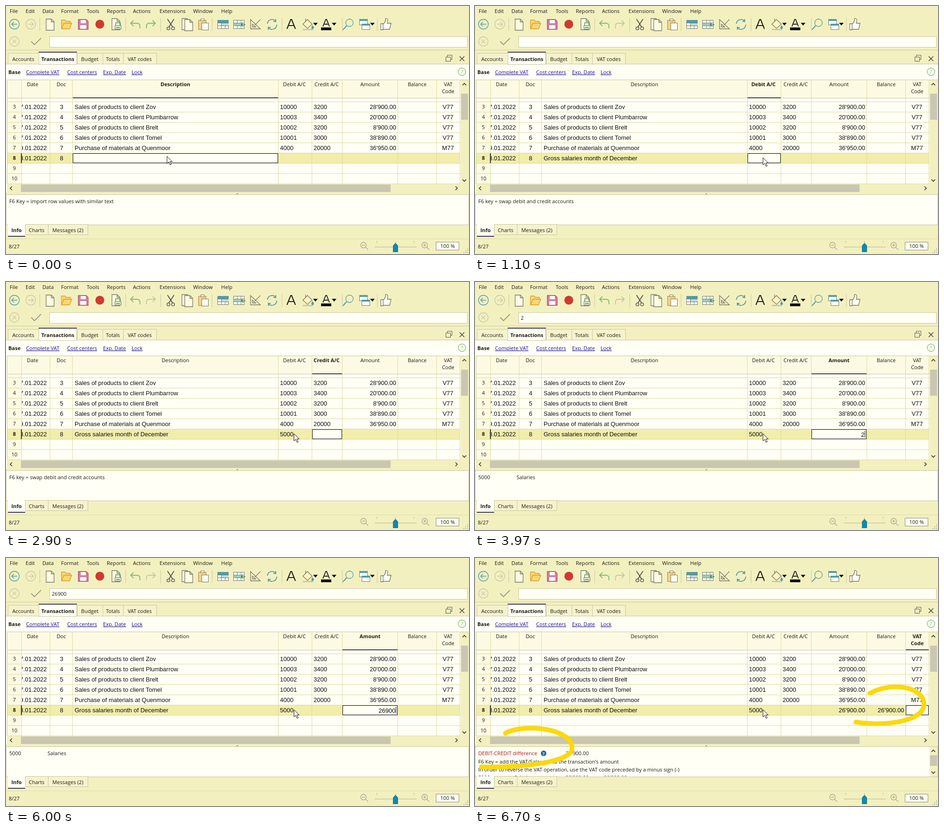
An HTML page for the animation above (6730 ms loop, 992 by 532 pixels).

```html
<!DOCTYPE html>
<html lang="en">
<head>
<meta charset="utf-8">
<title>Entering a transaction</title>
<style>
html, body { margin: 0; width: 100%; height: 100%; overflow: hidden; }
svg { display: block; width: 992px; height: 532px; background: #f3f0c0; }
text { font: 11.1px "Open Sans", sans-serif; white-space: pre; fill: #1c1c14; }
text.cell { font: 13px "Liberation Sans", Arial, sans-serif; fill: #111; }
text.bold { font-weight: 700; }
text.link { fill: #21108f; text-decoration: underline; }
rect { shape-rendering: crispEdges; }
</style>
</head>
<body>
<svg viewBox="0 0 992 532">
  <defs>
    <clipPath id="dateClip"><rect x="34" y="198" width="61" height="184"/></clipPath>
    <clipPath id="infoClip"><rect x="2" y="405" width="972" height="63"/></clipPath>
    <clipPath id="listClip"><rect x="585" y="337" width="389" height="138"/></clipPath>
  </defs>
  <g id="frame"></g>
  <g id="scene"></g>
</svg>
<script>
const LOOP = 6730;
const FACE = '#f3f0c0', PAPER = '#fffff6', LINE = '#c9c6a0', GRID = '#dedaa0', THUMB = '#c9c7b2';
const TEAL = '#4f9da6', GRAY = '#77776a', GREEN = '#7cbf6a', PALE = '#c9c8a8', INK = '#222';

const text = (x, y, s, cls = '', anchor = 'start', extra = '') =>
  `<text x="${x}" y="${y}" class="${cls}" text-anchor="${anchor}" ${extra}>${s}</text>`;
const rect = (x, y, w, h, fill, stroke) => stroke
  ? `<rect x="${x + .5}" y="${y + .5}" width="${w - 1}" height="${h - 1}" fill="${fill}" stroke="${stroke}"/>`
  : `<rect x="${x}" y="${y}" width="${w}" height="${h}" fill="${fill}"/>`;
const path = (d, stroke, fill = 'none', width = 1.3, extra = '') =>
  `<path d="${d}" stroke="${stroke}" fill="${fill}" stroke-width="${width}" ${extra}/>`;
const ring = (x, y, r, stroke, fill = 'none') =>
  `<circle cx="${x}" cy="${y}" r="${r}" stroke="${stroke}" fill="${fill}" stroke-width="1.3"/>`;
const group = (x, y, body) => `<g transform="translate(${x} ${y})">${body}</g>`;
const clip = (id, body) => `<g clip-path="url(#${id})">${body}</g>`;
const chevron = (x, y, dx, dy) => path(dx
  ? `M${x - 2 * dx} ${y - 4}l${4 * dx} 4l${-4 * dx} 4`
  : `M${x - 4} ${y - 2 * dy}l4 ${4 * dy}l4 ${-4 * dy}`, '#333', 'none', 1.6);
const drop = x => path(`M${x - 5} 36h10l-5 6z`, 'none', '#111');
const page = (x, y) => path(`M${x} ${y}h11l6 6v18h-17zM${x + 11} ${y}v6h6`, GRAY, '#fffbe0');
const lens = (x, y, sign, color) => ring(x, y, 6, color) + path(`M${x + 4} ${y + 4}l6 6M${x - 3} ${y}h6${sign}`, color);

const columns = {
  date: [34, 95, 'Date'], doc: [95, 143, 'Doc'], description: [143, 584, 'Description'],
  debit: [584, 656, 'Debit A/C'], credit: [656, 721, 'Credit A/C'], amount: [721, 840, 'Amount'],
  balance: [840, 923, 'Balance'], vat: [923, 973, 'VAT Code'],
};
const rows = [
  ['27.01.2022', 3, 'Sales of products to client Zov', '10000', '3200', "28'900.00", '', 'V77'],
  ['27.01.2022', 4, 'Sales of products to client Plumbarrow', '10003', '3400', "20'000.00", '', 'V77'],
  ['27.01.2022', 5, 'Sales of products to client Brelt', '10002', '3200', "8'900.00", '', 'V77'],
  ['27.01.2022', 6, 'Sales of products to client Tomel', '10001', '3000', "38'890.00", '', 'V77'],
  ['29.01.2022', 7, 'Purchase of materials at Quenmoor', '4000', '20000', "36'950.00", '', 'M77'],
];
const accounts = [
  ['5000', 'Salaries'], ['5700', 'Contribution to old age insurance and unemployment'],
  ['5710', 'Family equalization fund'], ['5720', 'Contribution to pension funds'],
  ['5730', 'Contribution to accident insurance'],
  ['5740', 'Contribution to voluntary daily benefits insurance'], ['5790', 'Other social contributions'],
];
const entry = 'Gross salaries month of December';

const cells = [[87.5, 'end'], [119, 'middle'], [147], [587], [659], [836, 'end'], [919.5, 'end'], [947, 'middle']];
const rowText = (values, y) => values.map((value, i) => {
  const cell = text(cells[i][0], y, value, 'cell', cells[i][1]);
  return i ? cell : clip('dateClip', cell);
}).join('');

function toolbar() {
  const seps = [72, 256, 331, 441, 591, 720, 795].map(x => rect(x, 26, 1, 28, LINE)).join('');
  const sheet = (x, mark) => group(x, 30,
    rect(0, 0, 24, 19, PAPER, GRAY) + path('M0 6.5h24M0 12.5h24M8.5 0v19M16.5 0v19', GRAY, 'none', 1) + mark);
  return seps
    + ring(18, 39, 10.5, TEAL) + path('M24 39h-12m5-5l-5 5l5 5', TEAL)
    + ring(53, 39, 10.5, PALE) + path('M47 39h12m-5-5l5 5l-5 5', PALE)
    + page(86, 28)
    + path('M119 49v-19h8l2 3h9v5M119 49l5-12h17l-5 12z', '#d99a2b', '#f9d873')
    + path('M155 29h17l4 4v17h-21z', '#a94a76', '#d27fa2') + rect(160, 30, 11, 7, PAPER) + rect(159, 41, 13, 8, PAPER)
    + `<circle cx="201" cy="39" r="9.5" fill="#d0392f"/>`
    + page(227, 27) + rect(233, 41, 14, 9, '#dcecd0', GRAY) + path('M235 41v-5h10v5M236 46h8', '#4f8f58')
    + path('M273 31l-6 6l6 6M267 37h13q7 0 7 6v5', GREEN, 'none', 1.8)
    + path('M346 28l11 17M360 28l-11 17', '#444', 'none', 1.6) + ring(348, 48, 3.2, '#444') + ring(358, 48, 3.2, '#444')
    + page(377, 27) + page(383, 29)
    + rect(412, 30, 17, 21, '#f3d285', '#a8874c') + rect(417, 27, 8, 5, PAPER, GRAY) + rect(419, 36, 15, 16, PAPER, GRAY)
    + sheet(453, rect(0, 0, 24, 6, TEAL) + rect(9, 7, 15, 5, '#bfdcd8'))
    + sheet(487, rect(0, 6, 18, 7, '#9dcdb0', TEAL) + path('M26 10h-9m4-4l-4 4l4 4', '#2f7a55'))
    + path('M524 29v20h21zM528 39v6h7zM545 29l-12 12', GRAY)
    + path('M560 38a10 10 0 0 1 18-5v-5m0 5h-5M580 40a10 10 0 0 1-18 6v5m0-5h5', TEAL, 'none', 1.8)
    + path('M602 49l8-20h2l8 20M605 42h12', INK, 'none', 2.2)
    + path('M636 39l10-10l10 10l-10 9zM642 34v-7', GRAY, '#fff5bc') + path('M657 42q4 6 0 7q-4-1 0-7', TEAL, TEAL)
    + rect(636, 49, 22, 3, PALE) + drop(663)
    + path('M679 44l6-15h2l6 15M681 39h10', INK, 'none', 1.9) + rect(675, 46, 22, 6, '#111') + drop(703)
    + ring(736, 36, 8, TEAL) + path('M730 42l-8 9', TEAL, 'none', 2)
    + rect(757, 28, 18, 13, PAPER, GRAY) + rect(757, 28, 18, 4, TEAL) + rect(762, 38, 18, 13, PAPER, GRAY)
    + rect(762, 38, 18, 4, TEAL) + drop(785)
    + path('M803 38h5v13h-5zM808 39q6-5 5-12q5-1 5 4l-1 6h8l-3 13h-14', GRAY, PAPER);
}

function windowFrame() {
  const menu = [['File', 8], ['Edit', 42], ['Data', 78], ['Format', 118], ['Tools', 173], ['Reports', 216],
    ['Actions', 272], ['Extensions', 329], ['Window', 401], ['Help', 461]];
  const tabs = [['Accounts', 4, 70], ['Budget', 152, 207], ['Totals', 207, 251], ['VAT codes', 251, 322]];
  const links = [['Complete VAT', 43], ['Cost centers', 131], ['Exp. Date', 208], ['Lock', 269]];
  const tab = ([label, x0, x1], y, h) =>
    rect(x0, y, x1 - x0 + 1, h, '#f6f3cc', LINE) + text((x0 + x1) / 2, y + 17, label, '', 'middle');
  let out = menu.map(([label, x]) => text(x, 15, label)).join('') + toolbar();
  out += ring(18, 76, 10, PALE) + path('M14 72l8 8m0-8l-8 8', PALE)
    + path('M54 76l7 7l14-14', '#9a9984', 'none', 1.8) + rect(93, 65, 896, 24, PAPER, LINE);

  out += rect(0, 94, 992, 1, LINE) + rect(0, 124, 992, 276, PAPER) + rect(0, 124, 992, 1, LINE)
    + tabs.map(t => tab(t, 101, 24)).join('')
    + rect(70, 98, 82, 28, PAPER, LINE) + rect(70, 98, 82, 2, '#3b3b52')
    + text(111, 118, 'Transactions', 'bold', 'middle')
    + path('M942.5 109.5h10v9h-10zM945.5 109v-3.5h10v9h-3', '#555', 'none', 1)
    + path('M972 108l10 10m0-10l-10 10', '#444', 'none', 1.5)
    + text(5, 146, 'Base', 'bold') + links.map(([label, x]) => text(x, 146, label, 'link')).join('')
    + ring(977, 141, 8, GREEN) + text(977, 145, '?', '', 'middle', `style="fill:${GREEN}"`);

  out += rect(2, 158, 972, 40, '#fcfae2') + rect(2, 198, 32, 183, '#fcfae2')
    + rect(2, 316, 971, 21, '#f1edaa') + rect(2, 158, 990, 1, LINE) + rect(2, 158, 1, 224, LINE) + rect(2, 197, 972, 1, LINE);
  for (let y = 205; y <= 381; y += 22) out += rect(2, y, 972, 1, GRID);
  for (const [x0, x1] of Object.values(columns)) out += rect(x0 - 1, 158, 1, 223, GRID) + rect(x1 - 1, 158, 1, 223, GRID);
  for (let n = 3; n <= 10; n++) out += text(18, 154 + n * 22, n, n === 8 ? 'bold' : '', 'middle');
  out += rect(32, 316, 2, 21, '#333') + rows.map((r, i) => rowText(r, 220.5 + i * 22)).join('');

  out += rect(974, 159, 18, 223, FACE) + rect(975, 188, 15, 56, THUMB) + chevron(982, 168, 0, -1) + chevron(982, 374, 0, 1)
    + rect(2, 382, 990, 18, FACE) + rect(32, 383, 792, 16, THUMB) + chevron(11, 391, -1) + chevron(965, 391, 1)
    + rect(494, 402, 3, 1, '#555') + rect(0, 404, 992, 66, PAPER, LINE)
    + tab(['Charts', 41, 90], 468, 23) + tab(['Messages (2)', 90, 175], 468, 23)
    + rect(4, 469, 37, 24, PAPER) + rect(4, 493, 37, 2, '#3b3b52') + text(22.5, 485, 'Info', 'bold', 'middle');

  out += rect(0, 499, 992, 1, '#dfdca8') + text(6, 520, '8/27')
    + lens(766, 513, '', '#aaa98c') + lens(897, 513, 'M897 510v6', '#aaa98c')
    + rect(790, 516, 90, 2, '#d5d2a2') + [794, 834, 874].map(x => rect(x, 504, 1, 4, '#bbb990')).join('')
    + path('M829 528v-14l5.5-6l5.5 6v14z', 'none', '#1687a7')
    + rect(921, 506, 50, 18, PAPER, '#8c8b78') + text(946, 519, '100 %', '', 'middle');
  for (let i = 0; i < 3; i++)
    for (let j = 0; j < 3 - i; j++) out += rect(988 - 4 * i, 528 - 4 * j, 2, 2, '#b8b58c');
  return out;
}

// Value of the last [time, value] step already reached.
const at = (t, steps) => steps.filter(([start]) => start <= t).pop()[1];
const clamp = v => v < 0 ? 0 : v > 1 ? 1 : v;
const mix = (a, b, p) => a + (b - a) * p;

function headers(selected) {
  return Object.entries(columns).map(([key, [x0, x1, label]]) => {
    const on = key === selected, cls = on ? 'bold' : '';
    const mid = { date: 57, debit: 618, credit: 687 }[key] || (x0 + x1 - 1) / 2;
    const style = key === 'balance' ? 'font-style="italic"' : '';
    const lines = key === 'vat' ? label.split(' ') : [label];
    return lines.map((s, i) => text(mid, 172 + 15 * i, s, cls, 'middle', style)).join('')
      + (on ? rect(x0, 196, x1 - x0 - 1, 2, '#44443c') : '');
  }).join('');
}

function accountList() {
  const items = accounts.map(([code, name], i) =>
    text(588, 352.5 + 22 * i, code, 'cell') + text(633, 352.5 + 22 * i, name, 'cell')).join('');
  return rect(584, 336, 408, 141, PAPER, '#777768') + clip('listClip', items)
    + path('M586.5 338.5h41v19h-41z', '#333', 'none', 1, 'stroke-dasharray="1 1"')
    + rect(974, 337, 17, 139, FACE) + rect(975, 408, 15, 19, THUMB) + chevron(982, 346, 0, -1) + chevron(982, 467, 0, 1);
}

function info(kind) {
  if (kind === 'import') return text(7, 423, 'F6 Key = import row values with similar text');
  if (kind === 'swap') return text(7, 423, 'F6 key = swap debit and credit accounts');
  if (kind === 'account') return text(7, 423, '5000') + text(89, 423, 'Salaries');
  return clip('infoClip', text(7, 423, 'DEBIT-CREDIT difference', '', 'start', 'style="fill:#b3140f"')
      + `<circle cx="147" cy="419" r="6" fill="#226f96"/>` + text(147, 422.5, '?', 'bold', 'middle', 'style="fill:#fff;font-size:9px"')
      + text(194, 423, "26'900.00") + text(7, 440.5, "F6 Key = add the VAT/Sales tax to the transaction's amount")
      + text(7, 458, 'In order to reverse the VAT operation, use the VAT code preceded by a minus sign (-)')
      + [['5000', 7], ['Salaries', 84], ["26'900.00", 194], ["26'900.00", 276]].map(([s, x]) => text(x, 475, s)).join(''))
    + rect(974, 405, 17, 64, FACE) + rect(975, 423, 15, 23, THUMB) + chevron(982, 414, 0, -1) + chevron(982, 460, 0, 1);
}

function pointer(t) {
  if (t >= 1700 && t < 2900) return path('M623.5 328.5h6M626.5 328.5v14M623.5 342.5h6', '#111', 'none', 1);
  const p = 1 - (1 - clamp(t / 1030)) ** 2;
  const y = p < .8 ? mix(322, 316, p / .8) : mix(316, 325, (p - .8) / .2);
  return group(mix(344, 616.5, p).toFixed(1), y.toFixed(1),
    path('M.5.5v15.5l3.7-3.4l3 6.4l2.5-1.2l-2.9-6.1h5z', '#111', '#fffff0', 1));
}

function strokes(t) {
  const p = clamp((t - 6470) / 230);
  return p ? ['M14 448C90 450 208 440 208 408C208 363 100 355 65 376', 'M816 352C880 362 960 350 962 315C964 280 900 262 846 290']
    .map(d => path(d, '#fbd90b', 'none', 10, `stroke-linecap="round" pathLength="1" stroke-dasharray="${p} 2"`)).join('') : '';
}

function scene(t) {
  const selected = at(t, [[0, 'description'], [900, 'debit'], [2900, 'credit'], [3330, 'amount'], [6030, 'vat']]);
  const panel = at(t, [[0, 'import'], [900, 'swap'], [2960, 'account'], [6030, 'difference']]);
  const typed = at(t, [[0, ''], [3970, '2'], [4700, '26'], [5000, '269'], [5430, '2690'], [5570, '26900'], [6030, '']]);
  const picking = t >= 1700 && t < 2900, done = t >= 6030;
  const description = entry.slice(0, Math.ceil(entry.length * clamp((t - 25) / 470)));
  const formula = t < 900 ? description : picking ? '5' : typed;
  const [x0, x1] = columns[selected], total = done ? "26'900.00" : '';

  let out = path('M314 31l6 6l-6 6M320 37h-13q-6 0-6 6v5', t < 30 ? GREEN : '#bfc9a0', 'none', 1.8)
    + text(98, 81, formula) + headers(selected)
    + rect(x0, 316, x1 - x0 - 1, 21, PAPER, '#111')
    + rowText(['28.01.2022', 8, description, t < 2900 ? '' : '5000', '', total, total, ''], 330.5)
    + info(panel);
  if (picking) out += rect(594, 319, 22, 16, '#3f95bd') + text(587, 330.5, '5<tspan style="fill:#fff">000</tspan>', 'cell') + accountList();
  if (typed) out += text(834.5, 331.5, typed, 'cell', 'end') + rect(835, 319, 1, 15, '#111');
  return out + pointer(t) + strokes(t);
}

const stage = document.getElementById('scene');
document.getElementById('frame').innerHTML = windowFrame();
const start = performance.now();
function tick() {
  stage.innerHTML = scene((performance.now() - start) % LOOP);
  requestAnimationFrame(tick);
}
tick();
</script>
</body>
</html>
```
